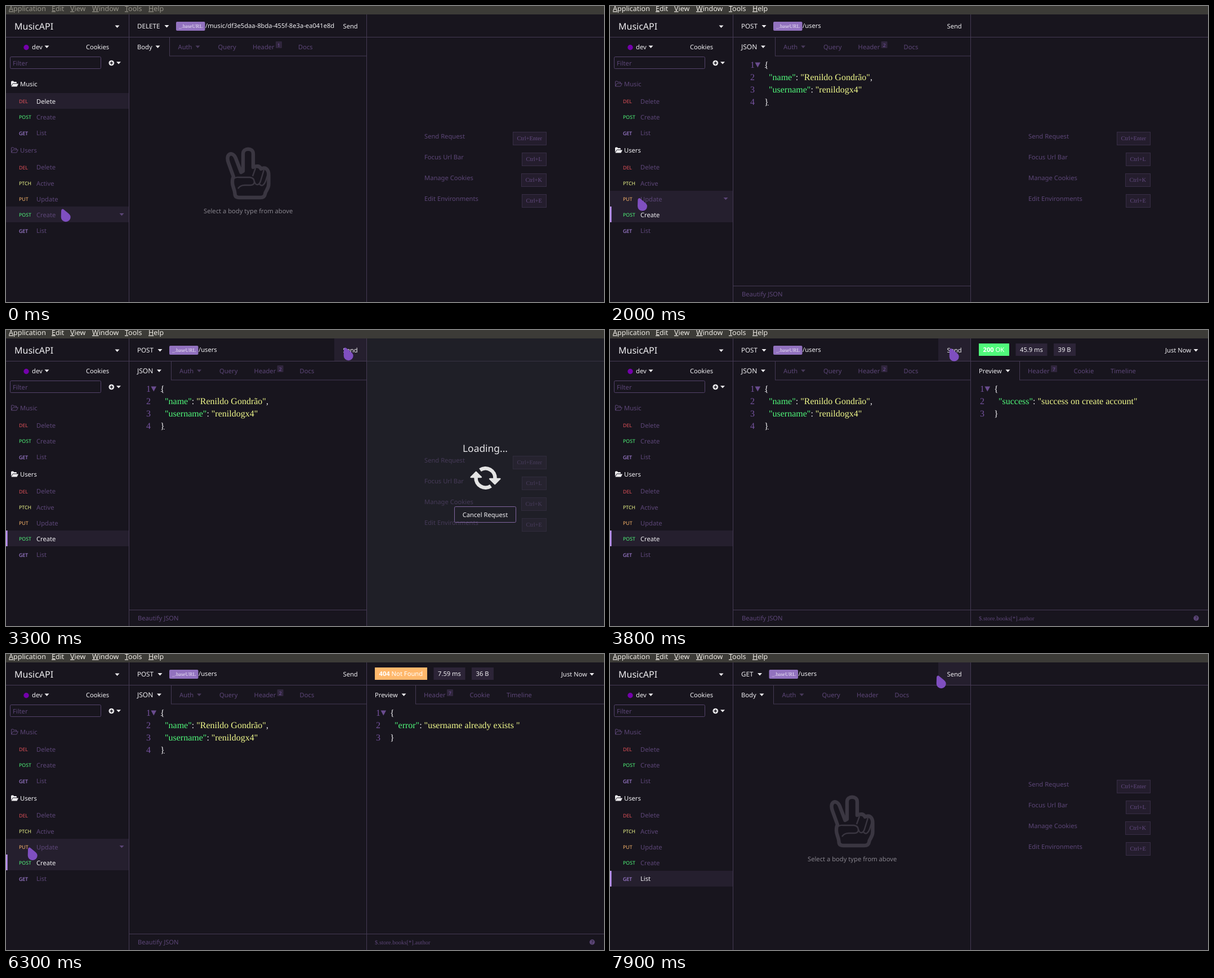
An HTML page that plays this animation: 1062x527 px, repeating every 8000 ms.

```html
<!DOCTYPE html>
<html lang="en">
<head>
<meta charset="utf-8">
<title>API client</title>
<style>
html, body { margin: 0; width: 100%; height: 100%; overflow: hidden; background: #18151e; }
svg { display: block; width: 1062px; height: 527px; text-rendering: geometricPrecision; }
text { font: 11.2px "Noto Sans", "Open Sans", sans-serif; white-space: pre; }
.code { font: 16px "Liberation Serif", "Times New Roman", serif; }
.small { font: 10.4px "Liberation Serif", "Times New Roman", serif; }
</style>
</head>
<body>
<svg id="stage" viewBox="0 0 1062 527"></svg>
<script>
const LOOP = 8000, STEP = 100;
const C = {
  bg: '#18151e', line: '#453a54', row: '#251f2e', text: '#f0eff2', dim: '#5c4677',
  number: '#7653a0', red: '#e5525a', green: '#50fa7b', yellow: '#f1fa8c',
  orange: '#ffb86c', violet: '#bd93f9', tag: '#9272bf', cursor: '#7f4fc0', chip: '#2c2437'
};

const text = (x, y, s, fill = C.text, extra = '') =>
  `<text x="${x}" y="${y}" fill="${fill}" ${extra}>${s}</text>`;
const rect = (x, y, w, h, fill, extra = '') =>
  `<rect x="${x}" y="${y}" width="${w}" height="${h}" fill="${fill}" ${extra}/>`;
const path = (d, fill, extra = '') => `<path d="${d}" fill="${fill}" ${extra}/>`;
const hline = (x1, x2, y) => rect(x1, y, x2 - x1, 1, C.line);
const vline = (x, y1, y2) => rect(x, y1, 1, y2 - y1, C.line);
const caret = (x, y, fill = C.text) => path(`M${x} ${y - 2}h8l-4 4.4z`, fill);
const size = px => `style="font-size:${px}px"`;
const span = (s, fill) => `<tspan fill="${fill}">${s}</tspan>`;

// Pointer moves: first step, last step, x, y reached
const moves = [
  [100, 200, 100, 361], [700, 800, 104, 365], [1900, 2100, 22, 330],
  [2200, 2600, 565, 53], [2700, 2700, 580, 38], [2800, 3000, 600, 31],
  [3500, 3600, 602, 32], [3800, 3800, 603, 32.5],
  [6000, 6200, 18, 344], [6300, 6300, 39, 344], [6500, 6600, 58, 391],
  [6800, 7600, 483, 62], [7700, 7700, 545, 60], [7800, 7800, 597, 28], [7900, 7900, 580, 38]
];

function pointer(t) {
  let x = 98, y = 361;
  for (const [from, to, mx, my] of moves) {
    if (t < from) break;
    const p = Math.min(1, (t - from + STEP) / (to - from + STEP));
    x += (mx - x) * p;
    y += (my - y) * p;
  }
  return { x, y };
}

const rows = [
  [169.5, 'DEL', 'Delete'], [197.8, 'POST', 'Create'], [226, 'GET', 'List'],
  [287, 'DEL', 'Delete'], [315.2, 'PTCH', 'Active'], [343.4, 'PUT', 'Update'],
  [371.6, 'POST', 'Create'], [400, 'GET', 'List']
];
const verbColor = { DEL: C.red, POST: C.green, GET: C.violet, PTCH: C.yellow, PUT: C.orange };

const pages = {
  del: { verb: 'DELETE', tag: 302, url: '/music/df3e5daa-8bda-455f-8e3a-ea041e8d', body: 'Body', badge: 1, row: 0 },
  post: { verb: 'POST', tag: 290, url: '/users', body: 'JSON', badge: 2, row: 6 },
  get: { verb: 'GET', tag: 282.5, url: '/users', body: 'Body', badge: 0, row: 7 }
};

function menu(active) {
  const items = [[5, 'Application'], [81, 'Edit'], [114, 'View'], [153, 'Window'], [211, 'Tools'], [253, 'Help']];
  return rect(0, 0, 1062, 15, '#3c3b37') + items.map(([x, s]) =>
    text(x, 8.5, `<tspan text-decoration="underline">${s[0]}</tspan>${s.slice(1)}`,
      active ? '#efece6' : '#969389', size(12.5))).join('');
}

function folder(y, name, open) {
  const fill = open ? C.text : C.dim;
  const icon = open
    ? path('M0 9V1.5Q0 0 1.5 0H4l1 1.5H9Q10 1.5 10 3V4H4Q3 4 2.4 5zM3.3 5H13L10.5 10H.5z', fill)
    : path('M.5 9.5V1Q.5 .5 1 .5H4l1 1.5H9.5V4.5M.5 9.5L3.3 4.5H12.3L9.8 9.5z', 'none', `stroke="${fill}"`);
  return `<g transform="translate(9 ${y - 5})">${icon}</g>` + text(25, y + 4.5, name, fill);
}

function sidebar(page, hot, barRow, barAlpha) {
  let s = text(15, 41.5, 'MusicAPI', C.text, size(16)) + caret(193.5, 36.5)
    + `<circle cx="36" cy="73.7" r="4.7" fill="#7400ab"/>`
    + text(46, 77, 'dev') + caret(68.5, 72.5) + text(142, 77, 'Cookies')
    + rect(7.5, 90.5, 161, 21, 'none', `rx="2" stroke="#54436b"`) + text(12, 105.5, 'Filter', C.dim)
    + `<circle cx="187.3" cy="101.5" r="4.8" fill="${C.text}"/>`
    + path('M184.5 101.5h5.6M187.3 98.7v5.6', 'none', `stroke="${C.bg}" stroke-width="1.5"`)
    + caret(196, 101.2)
    + folder(138.5, 'Music', page.row < 3) + folder(256.5, 'Users', page.row > 2);
  rows.forEach(([y, verb, name], i) => {
    const top = Math.floor(y - 14);
    if (i === page.row || i === hot) s += rect(0, top, 218, 28, C.row);
    if (i === barRow) s += rect(0, top, 2.6, 28, C.violet, `opacity="${barAlpha}"`);
    s += text(23, y + 3.6, verb, verbColor[verb], size(8.8))
      + text(54, y + 4.3, name, i === page.row ? C.text : C.dim);
    if (i === hot && i !== page.row) s += caret(201.5, y - .5, C.dim);
  });
  return s;
}

const badge = (x, s) => rect(x, 63, 11, 12, '#30263d', 'rx="1"')
  + text(x + 5.5, 72.5, s, C.number, `text-anchor="middle" ${size(8.5)}`);

// Numbered code lines with a fold mark on the first
function code(x, lines, fold) {
  let s = lines.map((l, i) => text(x - 17, 110 + 22 * i, i + 1, C.number, 'class="code" text-anchor="end"')
    + text(x, 110 + 22 * i, l, C.text, 'class="code"')).join('');
  if (fold) s += path(`M${x - 16.5} 100.5h9.6l-4.8 9z`, '#6a4c8f');
  return s;
}
const pair = (key, value, end = '') =>
  '  ' + span(`"${key}"`, C.green) + ': ' + span(`"${value}"`, C.yellow) + end;

function hand() {
  const outer = 'M404 304L395 279C389 262 403 258 408 271L417.5 296L421 294V263C421 252 439 252 439 263V287'
    + 'Q449 282 453 290C461 286 466.5 291 466.5 301V317C466.5 326 461 328 460 335Q459 341 452 341'
    + 'H414Q406.5 341 406.5 334C406 326 402 322 402 314Q402 307 404 304Z';
  const inner = 'M403 309Q407 304 414 305H433Q441 306 441 313Q441 319 434 319H424Q416 319 412 325'
    + 'M438 303L443 289M441 312C444 322 450 318 452 312L458 292M450 317C455 323 459 317 461 312L465 299';
  return path(outer, 'none', 'stroke="#3a3641" stroke-width="6.4" stroke-linejoin="round"')
    + path(inner, 'none', 'stroke="#3a3641" stroke-width="2.4"')
    + text(351, 368.5, 'Select a body type from above', '#85828b');
}

function request(page, sendHot) {
  const json = page.body === 'JSON', dx = json ? 2.6 : 0;
  const edge = json ? 293 : 290;
  let s = sendHot ? rect(583, 15, 57, 40, C.row) : '';
  s += text(233, 39.5, page.verb, C.text, size(11.6)) + caret(page.tag - 20.5, 36)
    + rect(page.tag, 28, 51.5, 16, C.tag, 'rx="2"')
    + text(page.tag + 5, 39, '_.baseURL', '#eee8f7', 'class="small" style="font-size:9.3px"')
    + text(page.tag + 52, 39, page.url) + text(598.5, 39.5, 'Send')
    + text(233, 77, page.body, C.text, size(json ? 12 : 11.2)) + caret(json ? 268 : 265.5, 72.5)
    + vline(edge, 55, 89) + hline(edge, 640, 88.5)
    + text(305.5 + dx, 77, 'Auth', C.dim) + caret(336.5 + dx, 72.5, '#493a5c')
    + text(376.5 + dx, 77, 'Query', C.dim) + text(438 + dx, 77, 'Header', C.dim)
    + text((page.badge ? 519 : 505.5) + dx, 77, 'Docs', C.dim);
  if (page.badge) s += badge(479 + dx, page.badge);
  if (!json) return s + hand();
  return s + code(274, ['{', pair('name', 'Renildo Gondrão', ','), pair('username', 'renildogx4'), '}'], true)
    + rect(275, 109, 1.5, 1, C.text) + rect(280, 176, 1.5, 1, C.text)
    + hline(219, 640, 498) + text(234, 517, 'Beautify JSON', C.dim);
}

function shortcuts() {
  const keys = [['Send Request', 'Enter', 900], ['Focus Url Bar', 'L', 916], ['Manage Cookies', 'K', 915], ['Edit Environments', 'E', 916]];
  return keys.map(([label, key, x], i) => {
    const y = 224 + 37 * i;
    return text(743, y + 11.5, label, C.dim)
      + rect(x + .5, y + .5, 959 - x, 23, '#241d2d', 'stroke="#372d45"')
      + text(x + 7.5, y + 15, 'Ctrl+' + key, '#634b80', 'class="small"');
  }).join('');
}

const ok = { code: 200, label: 'OK', fill: C.green, w: 54, time: '45.9 ms', size: '39 B', line: pair('success', 'success on create account') };
const missing = { code: 404, label: 'Not Found', fill: C.orange, w: 93, time: '7.59 ms', size: '36 B', line: pair('error', 'username already exists ') };

function response(r, fold) {
  const x = 655 + r.w + 11.5;
  return rect(655, 24, r.w, 22, r.fill)
    + text(662.5, 39.2, `<tspan font-weight="700">${r.code}</tspan> ${r.label}`, '#fff')
    + rect(x, 24, 56, 22, C.chip) + text(x + 7.5, 39.2, r.time)
    + rect(x + 67.5, 24, 39, 22, C.chip) + text(x + 75, 39.2, r.size)
    + text(986, 39.5, 'Just Now') + caret(1036.5, 36)
    + text(655, 77, 'Preview') + caret(702.5, 72.5)
    + vline(727, 55, 89) + hline(727, 1062, 88.5)
    + text(742, 77, 'Header', C.dim) + badge(783, 7)
    + text(823.5, 77, 'Cookie', C.dim) + text(889, 77, 'Timeline', C.dim)
    + code(682, ['{', r.line, '}'], fold)
    + hline(641, 1062, 498) + text(655, 516.5, '$.store.books[*].author', C.dim, 'class="small" style="font-size:10.6px"')
    + `<circle cx="1041" cy="513" r="4.7" fill="${C.dim}"/>`
    + text(1041, 516.2, '?', C.bg, `text-anchor="middle" font-weight="700" ${size(8.5)}`);
}

function loading(angle) {
  const half = path('M-16.8 -3.3A17 17 0 0 1 12.5 -11.5', 'none', 'stroke="#e4e4e4" stroke-width="6.6"')
    + path('M19.3 -17.3V-4.3H6.5z', '#e4e4e4', 'stroke="#e4e4e4" stroke-width="2.4" stroke-linejoin="round"');
  return rect(641, 15, 421, 512, '#282a31', 'opacity=".45"')
    + text(851, 216.5, 'Loading...', '#e6e5e8', `text-anchor="middle" ${size(17.4)}`)
    + `<g transform="translate(851.5 263.5) rotate(${angle})">${half}<g transform="rotate(180)">${half}</g></g>`
    + rect(796.5, 314.5, 109, 28, 'none', 'rx="2" stroke="#80659f"')
    + text(851, 333, 'Cancel Request', C.text, 'text-anchor="middle"');
}

function drawPointer({ x, y }, beam) {
  if (beam) return path(`M${x - 1.5} 34.5h4M${x + .5} 34.5v15M${x - 1.5} 49.5h4`, 'none', `stroke="${C.cursor}" stroke-width="1.4"`);
  return `<g transform="translate(${x} ${y})">`
    + path('M2 .5Q0 1 0 4L-.3 14.7A8.5 8.5 0 0 0 16.7 14.7Q16.5 11 12 7.5L5 1.8Q3.5 .2 2 .5Z', C.cursor) + '</g>';
}

function scene(t) {
  const page = t < 1500 ? pages.del : t < 6800 ? pages.post : pages.get;
  const p = pointer(t), hx = p.x + 4, hy = p.y + 2;
  const hot = hx < 218 ? rows.findIndex(r => Math.abs(hy - r[0]) <= 14) : -1;
  const overBar = hy > 15 && hy < 55;
  const sendHot = overBar && hx > 583 && hx < 640;
  const beam = t === 2700;

  const press = t < 6600 ? 1200 : 6500;
  const barRow = t < 1300 ? -1 : t < 6600 ? 6 : 7;
  const barAlpha = Math.min(1, (t - press) / 400);

  let right = shortcuts();
  if (t >= 3600 && t < 5500) right = response(ok, t >= 3800);
  else if (t >= 5500 && t < 6800) right = response(missing, true);
  if (t >= 3100 && t < 3600) right += loading((t - 3050) * .18);
  if (t >= 4900 && t < 5500) right += loading(t < 5000 ? 0 : 18);

  return rect(0, 0, 1062, 527, C.bg) + sidebar(page, hot, barRow, barAlpha)
    + request(page, sendHot && !beam)
    + hline(0, 1062, 55) + vline(218, 15, 527) + vline(640, 15, 527)
    + right + menu(t >= 1200) + drawPointer(p, beam);
}

const stage = document.getElementById('stage');
let shown = -1;
function tick() {
  const t = Math.floor(performance.now() % LOOP / STEP) * STEP;
  if (t !== shown) {
    shown = t;
    stage.innerHTML = scene(t);
  }
  requestAnimationFrame(tick);
}
tick();
</script>
</body>
</html>
```
